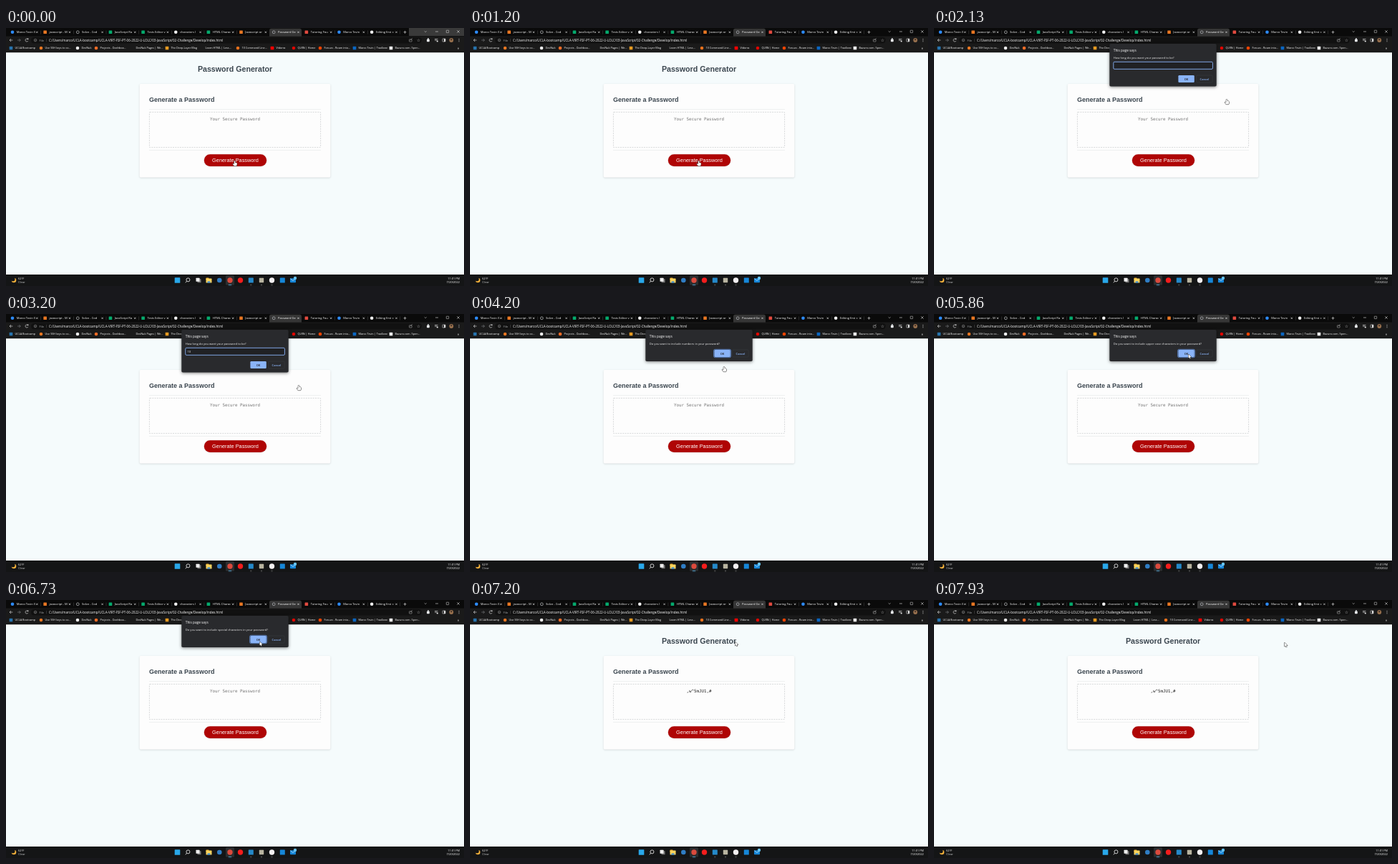
Recreate the animation shown at these times as an HTML page with a canvas. Size 640x360 px, loop 8000 ms.

```html
<!DOCTYPE html>
<html lang="en">
<head>
<meta charset="utf-8">
<title>Password Generator</title>
<style>
html, body { margin: 0; width: 100%; height: 100%; overflow: hidden; background: #f5fbfc; }
canvas { display: block; width: 640px; height: 360px; }
</style>
</head>
<body>
<canvas id="stage"></canvas>
<script>
const LOOP = 8000;
const UI = '"Open Sans", "Noto Sans", sans-serif';
const ARIAL = '"Liberation Sans", Arial, sans-serif';
const MONO = '"DejaVu Sans Mono", monospace';
const BLUE = '#8ab4f8';

const canvas = document.getElementById('stage');
const dpr = window.devicePixelRatio || 1;
canvas.width = 640 * dpr;
canvas.height = 360 * dpr;
const c = canvas.getContext('2d');
c.scale(dpr, dpr);

const tabs = [
  ['Marco Tevin S', '#2d8cff', 'dot'], ['javascript - M', '#e87722', 'box'],
  ['Solve - Cod', '#c8cacc', 'ring'], ['JavaScript Ra', '#04aa6d', 'box'],
  ['Tests Editor v', '#04aa6d', 'box'], ['characters l', '#f1f1f1', 'dot'],
  ['HTML Charac', '#04aa6d', 'box'], ['Javascript or', '#e87722', 'box'],
  ['Password Ge', '#b9bcc0', 'ring'], ['Tutoring Fou', '#e04a3f', 'box'],
  ['Marco Tevin', '#2d8cff', 'dot'], ['Editing first c', '#f1f1f1', 'dot']
];

const bookmarks = [
  [7, 'UCLA Bootcamp', '#2774ae', 'box'], [49, 'Use SSH keys to co...', '#e87722', 'dot'],
  [100, 'DevNuk', '#f1f1f1', 'dot'], [126, 'Projects - Dashboa...', '#fc6d26', 'dot'],
  [176, 'DevNuk Pages | We...', '', ''], [225, 'The Deep-Layer Blog', '#e59a22', 'box'],
  [273, 'Learn HTML | Less...', '', ''], [324, '10 Command Line...', '#e8711c', 'dot'],
  [372, 'Vidorra', '#f00', 'box'], [402, 'QLRN | Home', '#e10600', 'dot'],
  [439, 'Foruvo - Roam into...', '#ff4500', 'dot'], [487, 'Marco Tevin | Tradlane', '#0a66c2', 'box'],
  [538, 'Bazuro.com. Spen...', '#f1f1f1', 'box']
];

const prompts = [
  { from: 1290, to: 3840, text: 'How long do you want your password to be?', input: true },
  { from: 3900, to: 4870, text: 'Do you want to include numbers in your password?' },
  { from: 4930, to: 5670, text: 'Do you want to include lower case characters in your password?' },
  { from: 5730, to: 6340, text: 'Do you want to include upper case characters in your password?' },
  { from: 6400, to: 7100, text: 'Do you want to include special characters in your password?' }
];

// time, x, y of the pointer tip
const path = [
  [0, 319.5, 185], [1400, 319.5, 185], [2000, 409, 99], [3250, 409, 99],
  [3700, 355, 73], [4400, 355, 73], [4750, 355.5, 56], [5900, 355.5, 56],
  [6200, 354.5, 58], [7130, 354.5, 58], [7460, 490, 59.5], [8000, 490, 59.5]
];

function rect(x, y, w, h, fill) {
  c.fillStyle = fill;
  c.fillRect(x, y, w, h);
}

function round(x, y, w, h, r, fill, stroke, width = 0.6) {
  c.beginPath();
  c.roundRect(x, y, w, h, r);
  if (fill) { c.fillStyle = fill; c.fill(); }
  if (stroke) { c.strokeStyle = stroke; c.lineWidth = width; c.stroke(); }
}

function circle(x, y, r, fill, stroke, width) {
  round(x - r, y - r, 2 * r, 2 * r, r, fill, stroke, width);
}

function line(points, stroke, width = 0.6) {
  c.beginPath();
  points.forEach(([x, y], i) => i ? c.lineTo(x, y) : c.moveTo(x, y));
  c.strokeStyle = stroke;
  c.lineWidth = width;
  c.stroke();
}

function label(str, x, y, font, fill, align = 'left') {
  c.font = font;
  c.fillStyle = fill;
  c.textAlign = align;
  c.textBaseline = 'alphabetic';
  c.fillText(str, x, y);
}

function shadow(color, y, blur) {
  c.shadowColor = color;
  c.shadowOffsetY = y * dpr;
  c.shadowBlur = blur * dpr;
}

function icon(x, y, kind, color, r = 2.3) {
  if (kind === 'dot') circle(x, y, r, color);
  if (kind === 'box') round(x - r, y - r, 2 * r, 2 * r, 0.6, color);
  if (kind === 'ring') circle(x, y, r - 0.4, null, color, 0.7);
}

function cross(x, y, r, color) {
  line([[x - r, y - r], [x + r, y + r]], color, 0.6);
  line([[x + r, y - r], [x - r, y + r]], color, 0.6);
}

function drawTabs(t) {
  rect(0, 0, 640, 12, '#0a0a0a');
  // the free end of the strip starts out lit
  if (t < 60) rect(563, 0, 77, 11, '#3a3a3a');
  round(368, 0.8, 45, 12, [2.5, 2.5, 0, 0], '#363636');
  tabs.forEach(([name, color, kind], i) => {
    const x = 9 + i * 45.65;
    icon(x, 5.8, kind, color);
    c.save();
    c.beginPath();
    c.rect(x + 5, 0, 28.5, 12);
    c.clip();
    label(name, x + 5.8, 7.2, '4.1px ' + UI, '#fff');
    c.restore();
    cross(x + 34.3, 5.8, 1.2, '#eee');
    if (i < 7 || i > 8) rect(x + 39.5, 3.5, 0.4, 5, '#555');
  });
  line([[555.5, 5.8], [559.5, 5.8]], '#eee');
  line([[557.5, 3.8], [557.5, 7.8]], '#eee');
  line([[584.7, 4.3], [586.2, 5.7], [587.7, 4.3]], '#ccc');
  line([[600, 5], [604, 5]], '#ddd');
  round(615.3, 3.2, 3.4, 3.4, 0.3, null, '#ddd', 0.5);
  cross(632, 5, 1.7, '#ddd');
}

function drawToolbar() {
  rect(0, 11.5, 640, 22.7, '#1a1a1a');
  round(35, 12.8, 546, 8.6, 4.3, '#111');
  line([[9.3, 17], [5, 17]], '#eee');
  line([[7, 15], [5, 17], [7, 19]], '#eee');
  line([[16, 17], [20.3, 17]], '#85878a');
  line([[18.3, 15], [20.3, 17], [18.3, 19]], '#85878a');
  c.beginPath();
  c.arc(29, 17, 2, 0.4, 5.5);
  c.strokeStyle = '#eee';
  c.stroke();
  rect(29.8, 14.6, 1.5, 1.4, '#eee');
  circle(41, 17, 1.8, null, '#aaa', 0.5);
  rect(40.7, 16.5, 0.6, 1.6, '#aaa');
  label('File', 46.5, 18.6, '4.2px ' + UI, '#a5a8ac');
  rect(56.3, 14.8, 0.4, 4.5, '#666');
  label('C:/Users/marco/UCLA-bootcamp/UCLA-VIRT-FSF-PT-06-2022-U-LOLC/03-JavaScript/02-Challenge/Develop/index.html',
    60, 18.7, '4.52px ' + UI, '#fff');
  round(563.5, 15.8, 3.6, 3.2, 0.3, null, '#bbb', 0.5);
  line([[565, 17.2], [567.7, 14.4]], '#ddd', 0.5);
  label('☆', 576.5, 19, '5.5px "DejaVu Sans", sans-serif', '#ddd', 'center');
  round(588, 15.4, 3.8, 3.8, 0.8, '#e8eaed');
  circle(590, 15, 0.9, '#e8eaed');
  line([[599, 15.5], [603.5, 15.5]], '#ddd', 0.7);
  line([[599, 17.2], [602, 17.2]], '#ddd', 0.7);
  circle(602.8, 18.4, 1.1, '#ddd');
  round(610, 15, 4, 4, 0.4, null, '#ddd', 0.6);
  rect(612, 15, 2, 4, '#ddd');
  circle(622.3, 17, 2.9, '#99714e');
  circle(622.3, 16.1, 1.2, '#44352b');
  [15.2, 17, 18.8].forEach(y => circle(633, y, 0.5, '#ddd'));

  for (const [x, name, color, kind] of bookmarks) {
    icon(x, 28, kind, color);
    label(name, x + 5.5, 29.4, '3.8px ' + UI, '#fff');
  }
  label('»', 632, 29.5, '5px ' + UI, '#eee', 'center');
}

function drawPage(password) {
  rect(0, 34, 640, 310, '#f5fbfc');
  const ink = '#3b464f';
  label('Password Generator', 320, 61.2, 'bold 10.67px ' + ARIAL, ink, 'center');

  c.save();
  shadow('rgba(0,0,0,.15)', 0.7, 2.7);
  round(186.7, 78, 266.6, 130.5, 1.7, '#fdfdfd');
  c.restore();
  label('Generate a Password', 200, 103, 'bold 9px ' + ARIAL, ink);
  rect(200, 113, 240, 0.5, '#dfe2e3');
  rect(200, 170, 240, 0.5, '#dfe2e3');

  c.save();
  c.setLineDash([2, 1.3]);
  round(200.4, 117.4, 239.2, 49.2, 0.6, null, '#c8cbcc', 0.7);
  c.restore();
  label(password || 'Your Secure Password', 320, 128.7, '5.83px ' + MONO,
    password ? '#222' : '#757575', 'center');

  c.save();
  shadow('rgba(0,0,0,.18)', 0.3, 1.3);
  round(276.8, 176.3, 87.4, 16.6, 8.3, '#af0505');
  c.restore();
  label('Generate Password', 320.5, 187.1, '7.33px ' + ARIAL, '#fff', 'center');
}

function drawTaskbar() {
  const bar = '#141516';
  rect(0, 344, 640, 16, bar);
  circle(11, 352, 3.3, '#f2b03b');
  circle(9.6, 350.4, 2.9, bar);
  label('62°F', 17, 351.2, '4px ' + UI, '#fff');
  label('Clear', 17, 356.4, '4px ' + UI, '#c8cacc');

  icon(239.5, 352, 'box', '#29a8ea', 3.8);
  circle(254.4, 351.4, 2.5, null, '#e8e8e8', 0.9);
  line([[252.6, 353.3], [250.8, 355.3]], '#e8e8e8', 0.9);
  round(267.5, 350.3, 5, 5, 0.5, '#777');
  round(265.5, 348.8, 5, 5, 0.5, '#eee');
  round(279.5, 348.6, 4, 3, 0.6, '#e2a52b');
  round(279.5, 349.6, 8, 6, 0.6, '#fbd45c');
  rect(281.5, 353.5, 4, 2.1, '#3b8dd6');
  icon(298.3, 352, 'dot', '#2f7dc4', 3.3);
  round(307, 345.3, 12, 13.5, 1.5, '#2b2d2f');
  icon(313, 352, 'dot', '#db4a3d', 3.7);
  rect(310.8, 358, 4.4, 0.8, '#60b8f0');
  icon(327.5, 352, 'dot', '#f31d1d', 3.7);
  icon(342.3, 352, 'box', '#2489ca', 3.5);
  icon(357, 352, 'box', '#b8b4a0', 3.2);
  icon(371.5, 352, 'dot', '#f3f0f2', 3.7);
  icon(386.3, 352, 'box', '#1687d9', 3.5);
  round(397, 349.2, 8, 6, 0.7, '#1687d9');
  line([[397.3, 349.6], [401, 352.6], [404.7, 349.6]], '#cdeaff', 0.7);
  circle(404, 349, 2.2, '#69c5f3');
  [342.3, 357, 371.5].forEach(x => rect(x - 1, 358, 2, 0.7, '#888'));

  label('11:01 PM', 634, 351.2, '3.9px ' + UI, '#fff', 'right');
  label('7/20/2022', 634, 356.4, '3.9px ' + UI, '#fff', 'right');
}

function drawPrompt(p, t) {
  const k = Math.min(1, (t - p.from) / 130);
  const height = p.input ? 59.5 : 44;
  const buttonY = p.input ? 66 : 50;
  c.save();
  c.globalAlpha = Math.min(1, k * 2 + 0.1);
  c.translate(0, -8 * (1 - k) ** 3);
  c.save();
  shadow('rgba(0,0,0,.5)', 1, 4);
  round(245.3, 22, 149.4, height, 1.8, '#292a2d');
  c.restore();
  label('This page says', 250.8, 33.2, '4.75px ' + UI, '#fff');
  label(p.text, 250.8, 42.5, '4.12px ' + UI, '#eee');
  if (p.input) {
    round(250.8, 47.3, 138.6, 10, 1.3, '#202124', BLUE, 0.9);
    const typed = '10'.slice(0, (t > 2350) + (t > 2550));
    label(typed, 253.4, 53.7, '4px ' + UI, '#fff');
    if ((t - p.from) % 1060 < 530) {
      rect(253.6 + c.measureText(typed).width, 50, 0.4, 4.6, '#e8eaed');
    }
  } else {
    round(340.6, 49.3, 24, 11.4, 1.8, null, '#5579b3', 1);
  }
  round(341.4, buttonY, 22.4, 10, 1.3, BLUE);
  label('OK', 352.5, buttonY + 6.5, '600 4px ' + UI, '#202124', 'center');
  round(366.7, buttonY, 22.4, 10, 1.3, null, '#414449', 0.4);
  label('Cancel', 378, buttonY + 6.5, '600 4px ' + UI, BLUE, 'center');
  c.restore();
}

function pointerAt(t) {
  const i = Math.max(1, path.findIndex(p => p[0] > t));
  const [t0, x0, y0] = path[i - 1];
  const [t1, x1, y1] = path[i];
  const u = (t - t0) / (t1 - t0);
  const e = u * u * (3 - 2 * u);
  return [x0 + (x1 - x0) * e, y0 + (y1 - y0) * e];
}

function drawPointer(t) {
  const [x, y] = pointerAt(t);
  c.save();
  c.translate(x, y);
  c.lineJoin = 'round';
  const shape = new Path2D(t < 4450
    ? 'M-.7 .7Q0 -.5 .7 .7V2.8L2.8 3.3Q3.6 3.6 3.4 4.6L2.7 7.6H-.9L-2.7 4.8Q-2.5 3.8 -1.5 4.4L-.7 5Z'
    : 'M0 0V5.6L1.3 4.5L2.1 6.4L3 6L2.2 4.1H4Z');
  c.fillStyle = '#fff';
  c.strokeStyle = '#111';
  c.lineWidth = 0.9;
  c.stroke(shape);
  c.fill(shape);
  c.restore();
}

function draw(now) {
  const t = now % LOOP;
  drawPage(t >= 7100 ? ',w^5mJU1,#' : '');
  drawTabs(t);
  drawToolbar();
  drawTaskbar();
  const open = prompts.find(p => t >= p.from && t < p.to);
  if (open) drawPrompt(open, t);
  drawPointer(t);
}

const start = performance.now();
function tick() {
  draw(performance.now() - start);
  requestAnimationFrame(tick);
}
tick();
</script>
</body>
</html>
```
